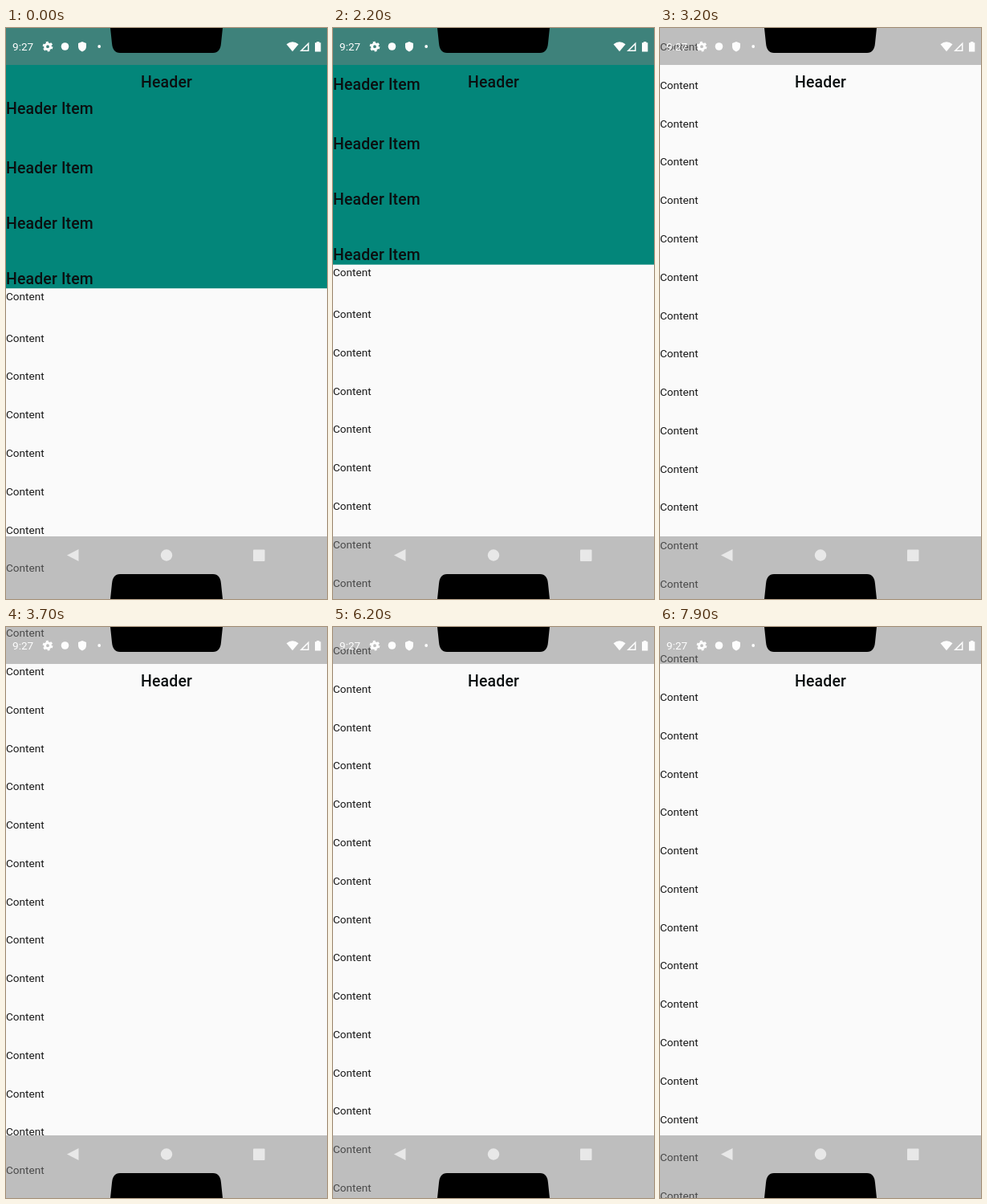
An HTML page that plays this animation: 400 by 711 pixels, repeating every 8000 ms.

```html
<!DOCTYPE html>
<html lang="en">
<head>
<meta charset="utf-8">
<title>Collapsing header</title>
<style>
  html, body { margin: 0; width: 100%; height: 100%; overflow: hidden; background: #fafafa; }
  svg { display: block; width: 400px; height: 711px; font-family: Roboto, sans-serif; }
  .title { font-size: 19.45px; font-weight: 500; letter-spacing: .146px; fill: #0b0f10; }
  .row { font-size: 13.6px; fill: #1a1a1a; }
  .bar { fill: rgba(124, 124, 124, .484); }
  .status { fill: #fdfdfd; }
  .nav { fill: #e8e8e8; }
</style>
</head>
<body>
<svg viewBox="0 0 400 711">
  <rect width="400" height="711" fill="#fafafa"/>
  <g id="list">
    <rect width="400" height="324.2" fill="#03867a"/>
  </g>
  <text class="title" x="200" y="74" text-anchor="middle">Header</text>

  <rect class="bar" width="400" height="46"/>
  <rect class="bar" y="633" width="400" height="78"/>
  <circle id="glow" cx="200" r="682" fill="#666"/>

  <g class="status">
    <text x="8" y="28" font-size="13.6">9:27</text>
    <circle cx="52" cy="23.2" r="3.4" fill="none" stroke="#fdfdfd" stroke-width="3"/>
    <circle cx="52" cy="23.2" r="5.4" fill="none" stroke="#fdfdfd" stroke-width="2" stroke-dasharray="2.9 2.755"/>
    <circle cx="73.5" cy="23" r="4.8"/>
    <path d="M95 17l5 2v4q0 4.5-5 6.5q-5-2-5-6.5v-4z"/>
    <circle cx="116.2" cy="23" r="1.9"/>
    <path d="M349.5 20.2q7.5-5.8 15 0l-7.500 9z"/>
    <path d="M377.5 17.5v11.5h-11.5zM376 21.2l-6.3 6.3h6.3z" fill-rule="evenodd"/>
    <path d="M387 17h3.4v1.3h1.9v11.2h-7.3v-11.2h2z"/>
  </g>
  <g class="nav">
    <path d="M76 656.5L90.5 649v15z"/>
    <circle cx="200" cy="656.5" r="7.2"/>
    <rect x="308" y="649.5" width="14.5" height="14.5" rx="1"/>
  </g>
  <path d="M130 0L132 19Q133 31 142 31H258Q267 31 268 19L270 0z"/>
  <path d="M130 711L132 692Q133 680 142 680H258Q267 680 268 692L270 711z"/>
</svg>
<script>
const LOOP = 8000, ROW = 47.78, ROWS = 34, BOTTOM = 1289.6;
const list = document.getElementById('list');
const glow = document.getElementById('glow');

function addText(cls, y, text) {
  const node = document.createElementNS('http://www.w3.org/2000/svg', 'text');
  node.setAttribute('class', cls);
  node.setAttribute('y', y);
  node.textContent = text;
  list.append(node);
}
for (const y of [107, 181, 250, 319]) addText('title', y, 'Header Item');
for (let i = 0; i < ROWS; i++) addText('row', i ? 390.7 + ROW * (i - 1) : 338.5, 'Content');

const linear = u => u;
const drag = u => u ** 1.6;
const fling = u => 1 - (1 - u) ** 2.82;

// start, end, scroll from, scroll to, easing
const moves = [
  [1900, 2800, 0, 170.5, drag],
  [2800, 4200, 170.5, 794.8, fling],
  [4400, 4900, 794.8, BOTTOM, drag],
  [6000, 7300, BOTTOM, 969.5, fling],
  [7500, 7900, 969.5, 967.6, linear]
];

function scrollAt(t) {
  let y = 0;
  for (const [start, end, from, to, ease] of moves) {
    if (t >= start) y = from + (to - from) * ease(Math.min(1, (t - start) / (end - start)));
  }
  return y;
}

// Overscroll edge glow: swells on impact, then recedes.
function glowAt(t) {
  if (t < 4850 || t > 5600) return 0;
  return t < 5000 ? (t - 4850) / 150 : 1 - ((t - 5000) / 600) ** 2;
}

function draw(now) {
  const t = now % LOOP, g = glowAt(t);
  list.setAttribute('transform', `translate(0 ${-scrollAt(t).toFixed(2)})`);
  glow.setAttribute('cy', 711 - 46 * g + 682);
  glow.setAttribute('opacity', 0.12 * g);
  requestAnimationFrame(draw);
}
requestAnimationFrame(draw);
</script>
</body>
</html>
```
